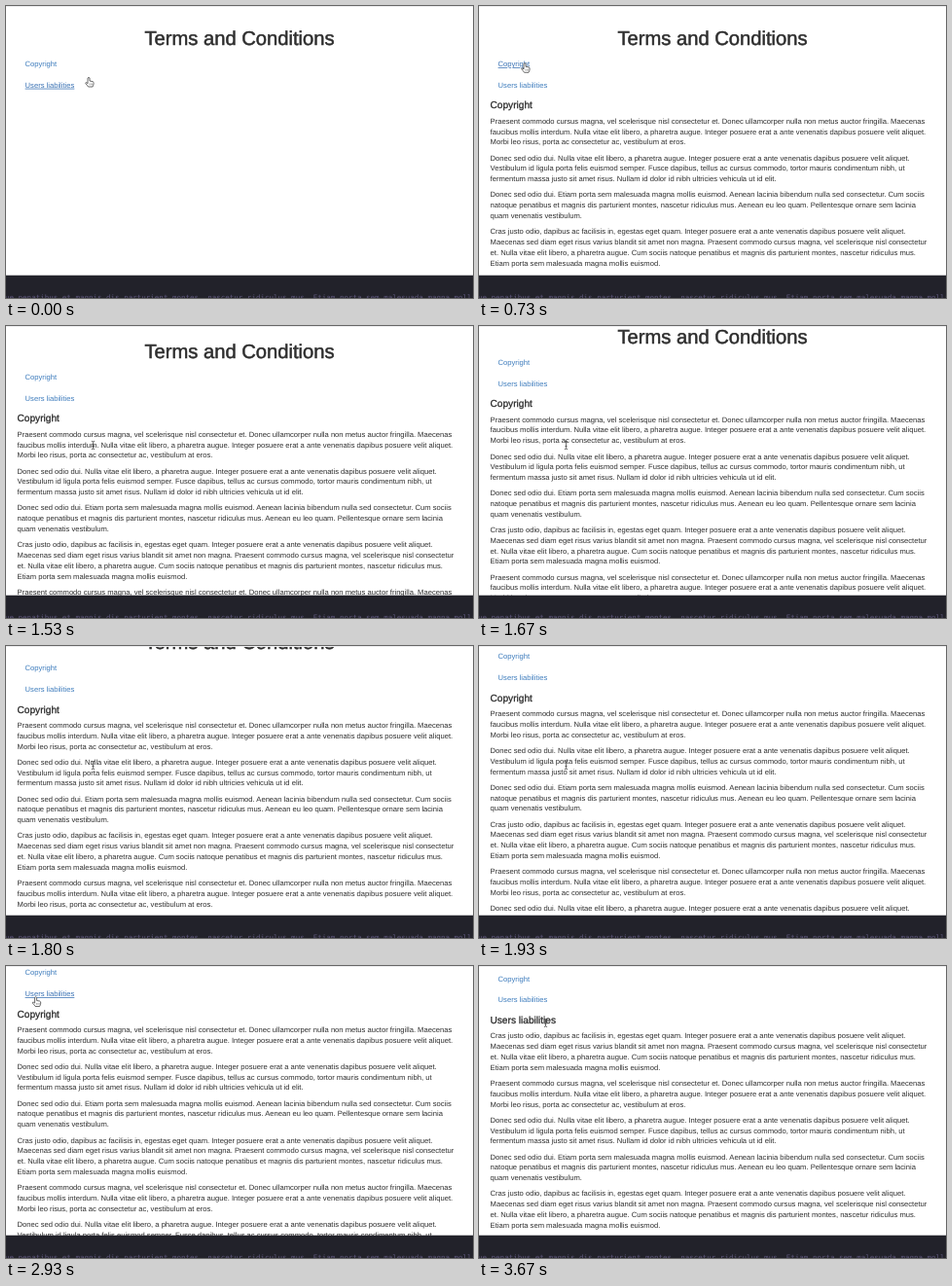
Animation of 480 by 300 pixels, one loop 3990 ms. Source, as an HTML page:

```html
<!DOCTYPE html>
<html lang="en">
<head>
<meta charset="utf-8">
<title>Terms and Conditions</title>
<style>
html, body { margin: 0; width: 100%; height: 100%; overflow: hidden; background: #fff; }
svg { display: block; width: 480px; height: 300px; }
text { font: 7.62px "Liberation Sans", Arial, sans-serif; fill: #2e2e2e; white-space: pre; text-rendering: geometricPrecision; }
.title { font-size: 20.2px; stroke: #2b2b2b; stroke-width: .5; }
.head { font-size: 10.15px; fill: #262626; stroke: #262626; stroke-width: .25; }
.link { fill: #3f7dbd; }
.hover { fill: #3a72b4; text-decoration: underline; text-decoration-thickness: .6px; }
.code { font: 7.53px "DejaVu Sans Mono", monospace; fill: #5f587c; }
</style>
</head>
<body>
<svg viewBox="0 0 480 300">
  <rect width="480" height="300" fill="#fff"/>
  <g id="page">
    <text class="title" x="240" y="39.8" text-anchor="middle">Terms and Conditions</text>
    <text class="link" x="19.6" y="62">Copyright</text>
    <text class="link" x="19.6" y="83.7">Users liabilities</text>
    <g id="copyright"></g>
    <g id="users"></g>
  </g>
  <rect width="480" height="1" fill="#ececee"/>
  <rect y="276.7" width="480" height="24" fill="#22222a"/>
  <text class="code" x="-1" y="302.4">ue penatibus et magnis dis parturient montes, nascetur ridiculus mus. Etiam porta sem malesuada magna mollis</text>
  <g id="cursor">
    <g id="hand" fill="#fff" stroke="#3a3a3a" stroke-width=".75" stroke-linejoin="round">
      <path d="M-1 1Q0-.4 1 1V4L4.2 4.6Q5.3 5 5.1 6.6Q5 8.3 4 10H-.5Q-1.6 8.3-3.2 6.6Q-3.4 5.3-2.2 5.7L-1 6.6Z"/>
      <path d="M.9 6.5V8.3M2.3 6.5V8.3M3.6 6.5V8.3" stroke-width=".4"/>
    </g>
    <path id="beam" d="M-1.6-4.2Q0-4.2 0-3.2V3.2Q0 4.2-1.6 4.2M1.6-4.2Q0-4.2 0-3.2M0 3.2Q0 4.2 1.6 4.2M-1 1H1" fill="none" stroke="#333" stroke-width=".7"/>
  </g>
</svg>
<script>
const $ = id => document.getElementById(id);
const LOOP = 3990, TICK = 200 / 3, LINE = 10.77, GAP = 5.5;

const praesent = `Praesent commodo cursus magna, vel scelerisque nisl consectetur et. Donec ullamcorper nulla non metus auctor fringilla. Maecenas
faucibus mollis interdum. Nulla vitae elit libero, a pharetra augue. Integer posuere erat a ante venenatis dapibus posuere velit aliquet.
Morbi leo risus, porta ac consectetur ac, vestibulum at eros.`;
const donec = `Donec sed odio dui. Nulla vitae elit libero, a pharetra augue. Integer posuere erat a ante venenatis dapibus posuere velit aliquet.
Vestibulum id ligula porta felis euismod semper. Fusce dapibus, tellus ac cursus commodo, tortor mauris condimentum nibh, ut
fermentum massa justo sit amet risus. Nullam id dolor id nibh ultricies vehicula ut id elit.`;
const etiam = `Donec sed odio dui. Etiam porta sem malesuada magna mollis euismod. Aenean lacinia bibendum nulla sed consectetur. Cum sociis
natoque penatibus et magnis dis parturient montes, nascetur ridiculus mus. Aenean eu leo quam. Pellentesque ornare sem lacinia
quam venenatis vestibulum.`;
const cras = `Cras justo odio, dapibus ac facilisis in, egestas eget quam. Integer posuere erat a ante venenatis dapibus posuere velit aliquet.
Maecenas sed diam eget risus varius blandit sit amet non magna. Praesent commodo cursus magna, vel scelerisque nisl consectetur
et. Nulla vitae elit libero, a pharetra augue. Cum sociis natoque penatibus et magnis dis parturient montes, nascetur ridiculus mus.
Etiam porta sem malesuada magna mollis euismod.`;

function fill(id, heading, paragraphs) {
  let y = 120.8, out = `<text class="head" x="11.5" y="105.4">${heading}</text>`;
  for (const p of paragraphs) {
    for (const line of p.split("\n")) {
      out += `<text x="11.6" y="${y.toFixed(2)}">${line}</text>`;
      y += LINE;
    }
    y += GAP;
  }
  $(id).innerHTML = out;
}
fill("copyright", "Copyright", [praesent, donec, etiam, cras, praesent, donec]);
fill("users", "Users liabilities", [cras, praesent, donec, etiam, cras]);

const progress = (n, from, to) => Math.min(1, Math.max(0, (n - from) / (to - from)));
const ease = p => (1 - Math.cos(Math.PI * p)) / 2;
const curve = (a, b, c, p) => (1 - p) ** 2 * a + 2 * p * (1 - p) * b + p * p * c;

// The pointer glides from rest to rest, each time bent towards a point.
const rest = { x: 85, y: 73 };
const glides = [
  { from: 0, to: 9, bend: [62, 38], end: [47, 58.3] },
  { from: 16, to: 19, bend: [68, 90], end: [89.5, 122.5] },
  { from: 32, to: 40, bend: [-5, -5], end: [29, 35] },
  { from: 40, to: 44, bend: [30, 33], end: [30.6, 31.5] },
  { from: 51, to: 55, bend: [50, 45], end: [68.5, 58.3] }
];

function pointer(n) {
  let { x, y } = rest;
  for (const { from, to, bend, end } of glides) {
    const p = ease(progress(n, from, to));
    x = curve(x, bend[0], end[0], p);
    y = curve(y, bend[1], end[1], p);
  }
  return [x, y];
}

function scrollTop(n) {
  const p = progress(n, 22, 30);
  return n < 46 ? 52.7 * (p + p * p * (1 - p) / 2) : 46.4;
}

const links = document.querySelectorAll(".link");
const show = (id, on) => $(id).setAttribute("display", on ? "inline" : "none");
const move = (id, x, y) => $(id).setAttribute("transform", `translate(${x} ${y})`);

function draw(now) {
  const n = Math.floor((now % LOOP + 4) / TICK);
  const [x, y] = pointer(n), scroll = scrollTop(n);
  const row = Math.floor((y + scroll - 48.5) / 21.5);
  move("page", 0, -scroll);
  move("cursor", x, y);
  links.forEach((link, i) => link.classList.toggle("hover", i === row));
  show("copyright", n >= 11 && n < 46);
  show("users", n >= 46);
  show("hand", row < 2);
  show("beam", row >= 2);
  requestAnimationFrame(() => draw(performance.now()));
}
draw(0);
</script>
</body>
</html>
```
